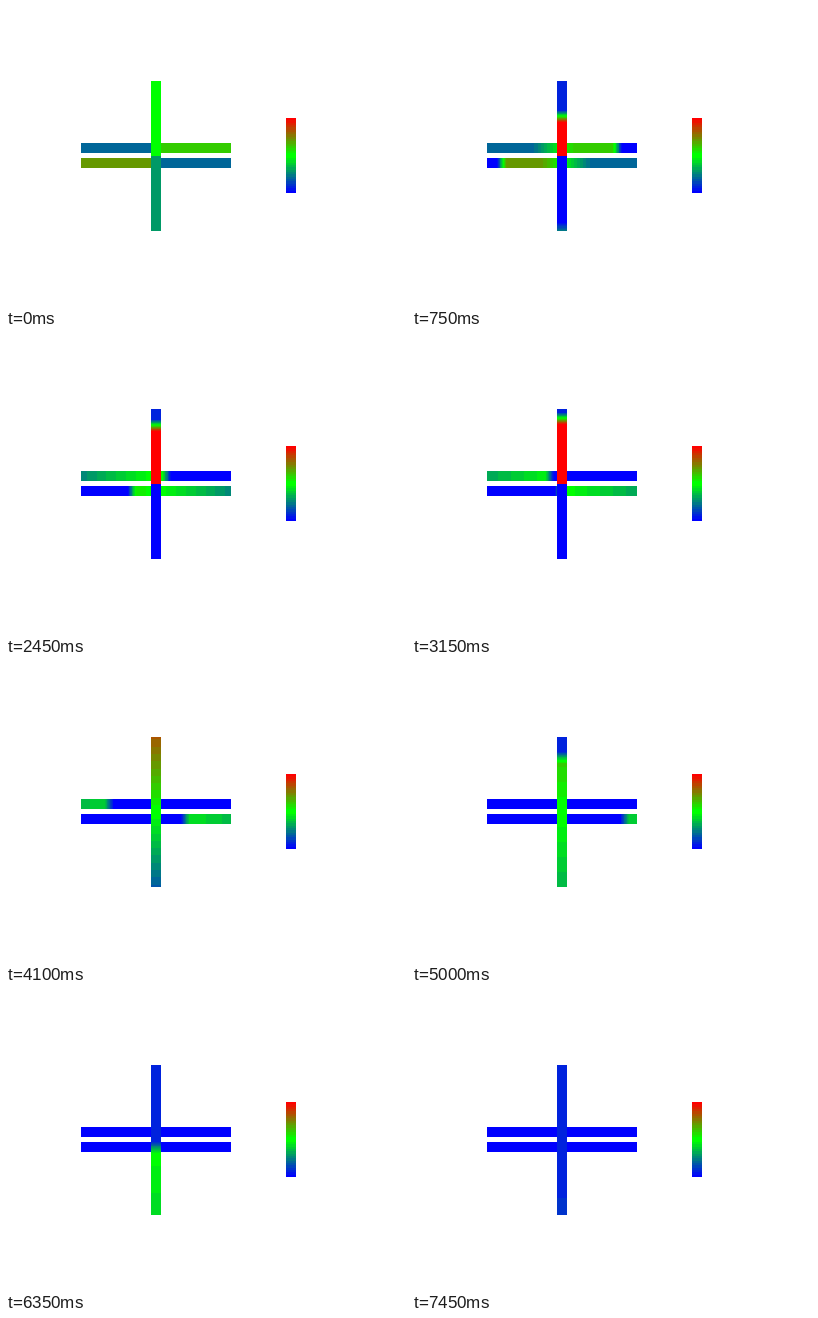
These frames come from a looping animation (400 px wide and 300 px high, 7.7 s). An HTML page with a canvas:

```html
<!DOCTYPE html>
<html lang="en">
<head>
<meta charset="utf-8">
<title>Traffic density at a crossing</title>
<style>
  html, body { margin: 0; width: 100%; height: 100%; overflow: hidden; background: #fff; }
  canvas { display: block; width: 400px; height: 300px; }
</style>
</head>
<body>
<canvas id="stage" width="400" height="300"></canvas>
<script>
const ctx = document.getElementById('stage').getContext('2d');
const LOOP = 7700, STEP = 50, LAST = 7450;
const HALF = 75, MID = 150, WIDTH = 10;
const LEVELS = 32;
const GREEN_AT = 3250;      // vertical road gets its green light
const V_MAIN = 3 / 22;      // free speeds in px per ms
const V_SIDE = 0.0647;
const INFLOW = 0.08;

const clamp = (x, lo, hi) => Math.min(hi, Math.max(lo, x));

// Density 0..1 as blue, green, red in 32 levels
function paint(density) {
  const level = clamp(Math.floor(density * LEVELS + 1e-6), 0, LEVELS - 1);
  const top = LEVELS / 2 - 1;
  if (level <= top) {
    const g = Math.round(255 * level / top);
    return `rgb(0,${g},${255 - g})`;
  }
  const r = Math.round(255 * (level - top - 1) / top);
  return `rgb(${r},${255 - r},0)`;
}

// Rarefaction fan opening at the stop line; reach = speed * time
function fan(x, reach, up, down) {
  if (reach <= 0) return x < 0 ? up : down;
  return clamp(0.5 * (1 - x / reach), down, up);
}

// Side road: discharging from the start, nothing flows in behind
function sideRoad(t, up, down) {
  const reach = V_SIDE * t;
  const tail = reach < HALF / up
    ? -HALF + (1 - up) * reach
    : reach - Math.sqrt(300 * up * reach);
  return x => x < tail ? 0 : fan(x, reach, up, down);
}

// Main road: queue behind a red light, then discharge
function mainRoad(t) {
  const queueTail = -31.8 - 0.0107 * t;
  if (t < GREEN_AT) {
    const tail = Math.min(-HALF + 0.0571 * t, queueTail);
    const jam = -V_MAIN * t / 2;
    const gap = 0.7 * V_MAIN * t;
    return x => {
      if (x >= 0) return x < gap ? 0 : 0.3;
      if (x < tail) return INFLOW;
      return x < jam ? 0.5 : 1;
    };
  }
  const since = t - GREEN_AT;
  const reach = V_MAIN * since;
  let tail = 0.1028 * since - 5.596 * Math.sqrt(since);
  if (since < 741) tail = Math.min(tail, queueTail);
  else tail += 0.06 * Math.max(0, since - 3950);
  return x => {
    if (x < tail) return x > 55 ? 0.1 : INFLOW;
    return fan(x, reach, 1, 0);
  };
}

// Averages over a short window that stays within one half of the road
function smooth(profile, x, span) {
  const lo = x < 0 ? -HALF : 0.01;
  const hi = x < 0 ? -0.01 : HALF;
  const n = 12;
  let sum = 0;
  for (let i = 0; i < n; i++) {
    sum += profile(clamp(x + span * ((i + 0.5) / n - 0.5), lo, hi));
  }
  return sum / n;
}

function drawRoad(profile, span, place) {
  for (let i = 0; i < 2 * HALF; i++) {
    ctx.fillStyle = paint(smooth(profile, i + 0.5 - HALF, span));
    ctx.fillRect(...place(i));
  }
}

function drawLegend() {
  for (let i = 0; i < HALF; i++) {
    ctx.fillStyle = paint(1 - (i + 0.5) / HALF);
    ctx.fillRect(280, 112 + i, WIDTH, 1);
  }
}

function draw(t) {
  ctx.fillStyle = '#fff';
  ctx.fillRect(0, 0, 400, 300);
  const start = MID - HALF, end = MID + HALF;
  drawRoad(sideRoad(t, 0.6, 0.2), 9, i => [end - 1 - i, 137, 1, WIDTH]);
  drawRoad(sideRoad(t, 0.7, 0.2), 9, i => [start + i, 152, 1, WIDTH]);
  drawRoad(mainRoad(t), 12, i => [145, start + i, WIDTH, 1]);
  drawLegend();
}

const begin = performance.now();
let shown = -1;
function tick() {
  const t = (performance.now() - begin) % LOOP;
  const step = Math.min(LAST, Math.floor(t / STEP) * STEP);
  if (step !== shown) draw(shown = step);
  requestAnimationFrame(tick);
}
tick();
</script>
</body>
</html>
```
